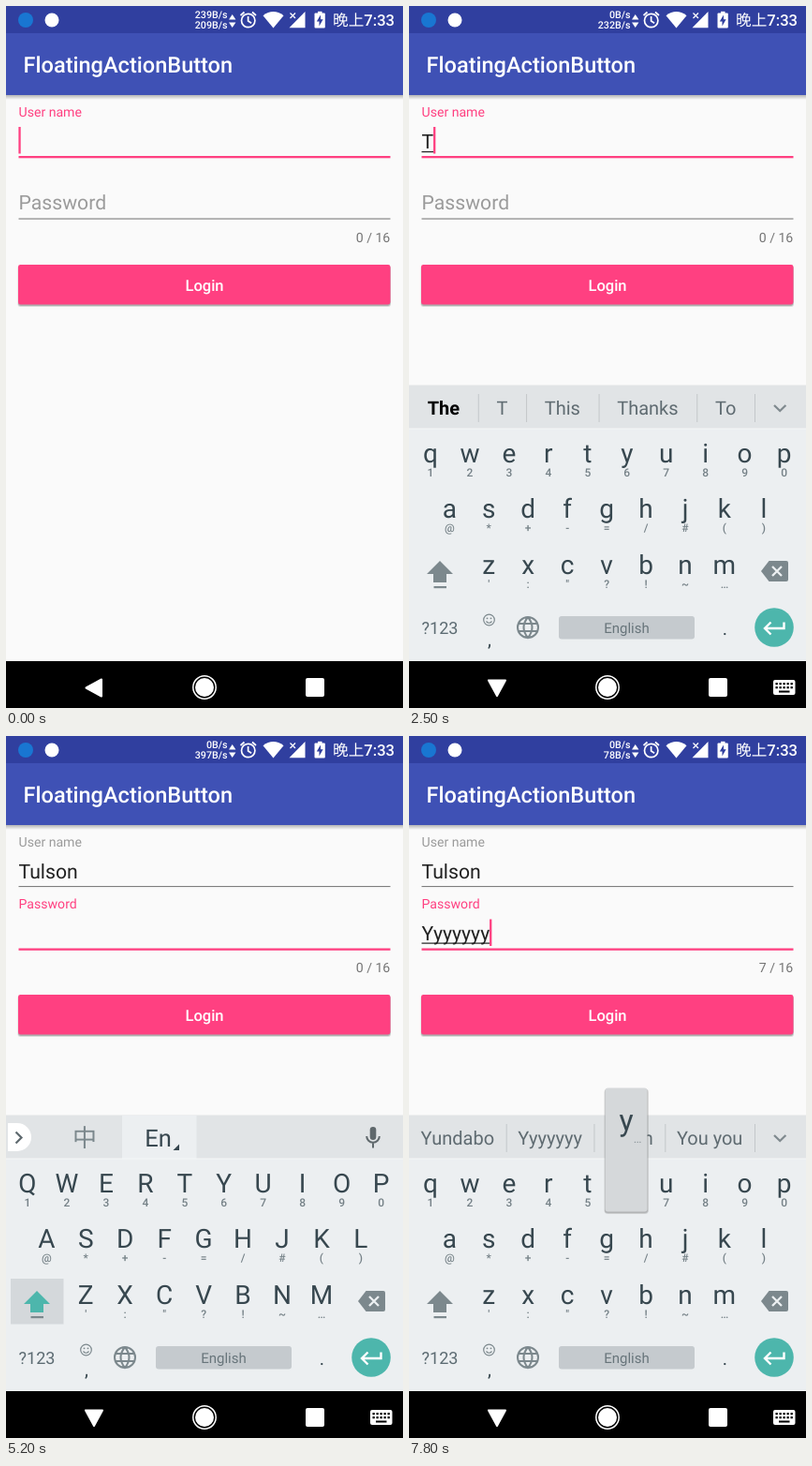
Write an HTML page that moves like this. It is 424 by 749 pixels and loops after 8 s.

```html
<!DOCTYPE html>
<html lang="en">
<head>
<meta charset="utf-8">
<title>Login form</title>
<style>
html, body { margin: 0; width: 100%; height: 100%; overflow: hidden; background: #fafafa; }
svg { display: block; font-family: Roboto, "Noto Sans CJK SC", "Noto Sans CJK", sans-serif; text-rendering: geometricPrecision; }
</style>
</head>
<body>
<svg id="stage" width="424" height="749" viewBox="0 0 424 749"></svg>
<script>
const LOOP = 8000, TICK = 100;
const PINK = '#ff4081', GREY = '#9b9b9b', RED = '#cc0000', TEAL = '#4db6ac';
const KEY = '#37474f', SUB = '#758187', ICON = '#7c888d', STRIP = '#e1e4e6', BODY = '#eceff1';
const stage = document.getElementById('stage');
const pen = document.createElement('canvas').getContext('2d');

// Timelines: each row holds from its time until the next row.
const speeds = [[0, 239, 209], [100, 0, 120], [1000, 51, 336], [1900, 0, 232], [2800, 51, 329],
  [3700, 0, 257], [4700, 0, 397], [5600, 51, 257], [6500, 52, 156], [7400, 0, 78]];
const userText = [[0, ''], [2400, 'T'], [2700, 'Tu'], [2800, 'Tul'], [3000, 'Tuls'], [3100, 'Tulso'], [3300, 'Tulson']];
const passLength = [[0, 0], [6500, 1], [6700, 2], [6800, 3], [7000, 4], [7200, 5], [7400, 6], [7700, 7]];
const hints = [[0, ''], [2400, '*The|T|This|Thanks|To'], [2700, '*Tuesday|Tu|Turn|Tune'], [2800, '*Tulip|Tul|Tulips|Full'],
  [3000, '*Tulson|Tuls|Tulip|Pulse'], [3100, '*Tulson|Tulso|Tulson\'s|Tutor'], [3300, '*Tulson|Tulson\'s|Tutor|Tuition'],
  [3800, ''], [6500, '*You|Y|Yes|Your|Yeah'], [6700, '*Yy|Yu|My|By|Ty|Yay'], [6800, '*You|Yyy|Guy|Try|Buy|But'],
  [7000, '*Yyyy|Yay|Yummy|Yay y'], [7200, 'Yyyyy|Yummy|Yearly|You y'], [7400, 'Yyyyyy|Yummy|Yearly|You y'],
  [7700, 'Yundabo|Yyyyyyy|Yearn|You you']];
// key, column centre, row, start, end
const popups = [['T', 190, 0, 2400, 2500], ['u', 274, 0, 2700, 2900], ['l', 379, 1, 2800, 2900], ['s', 85, 1, 3000, 3200],
  ['o', 359, 0, 3100, 3200], ['n', 295, 2, 3300, 3400], ['Y', 232, 0, 6500, 6600], ['y', 232, 0, 6700, 7500], ['y', 232, 0, 7700, LOOP]];
const rows = [['qwertyuiop', '1234567890', 23, 487], ['asdfghjkl', '@*+-=/#()', 43.3, 546], ['zxcvbnm', '\':"?!~…', 85.2, 606]];

const at = (table, t) => table.filter(row => row[0] <= t).pop();
const within = (t, ...spans) => spans.some(([a, b]) => t >= a && t < b);
const progress = (t, start, length) => Math.min(1, Math.max(0, (t - start) / length));
const easeOut = p => 1 - (1 - p) ** 2;
const lerp = (a, b, p) => a + (b - a) * p;
const mix = (a, b, p) => `color-mix(in srgb, ${b} ${p * 100}%, ${a})`;

const rect = (x, y, w, h, fill, rx = 0) => `<rect x="${x}" y="${y}" width="${w}" height="${h}" rx="${rx}" fill="${fill}"/>`;
const disc = (x, y, r, fill) => `<circle cx="${x}" cy="${y}" r="${r}" fill="${fill}"/>`;
const shape = (d, fill) => `<path d="${d}" fill="${fill}"/>`;
const line = (d, color, w = 2) => `<path d="${d}" fill="none" stroke="${color}" stroke-width="${w}"/>`;
const group = (attrs, content) => `<g ${attrs}>${content}</g>`;
const text = (x, y, size, fill, str, anchor = 'middle', weight = 400) =>
  `<text x="${x}" y="${y}" font-size="${size}" fill="${fill}" text-anchor="${anchor}" font-weight="${weight}">${str}</text>`;

function width(str, size, weight = 400) {
  pen.font = `${weight} ${size}px Roboto, sans-serif`;
  return pen.measureText(str).width;
}

function statusBar(t) {
  const [, up, down] = at(speeds, t), bar = '#303f9f';
  return rect(0, 0, 424, 29, bar) + disc(21, 15, 8, '#1976d2') + disc(49, 15, 7.5, '#fff')
    + text(236.5, 13, 10.7, '#fff', up + 'B/s', 'end', 500) + text(236.5, 24, 10.7, '#fff', down + 'B/s', 'end', 500)
    + shape('M238 14.5L241.7 9L245.4 14.5ZM238 17.5H245.4L241.7 23Z', '#fff')
    + line('M251.5 15.5a7.2 7.2 0 1 0 14.4 0a7.2 7.2 0 1 0 -14.4 0M258.6 11v5l3.5 2.2M250.5 10l4-3.5M267 10l-4-3.5', '#fff', 1.7)
    + shape('M274.5 10.2Q285.5 2 296.5 10.2L285.5 23.5Z', '#fff')
    + shape('M319.5 6V23.3H302.5Z', '#fff') + line('M303.5 7.5l5.5 5.5m0-5.5l-5.5 5.5', '#fff', 1.3)
    + rect(329.5, 7.5, 11.3, 16, '#fff', 1) + rect(333, 5.8, 4.5, 3, '#fff')
    + shape('M336 9.5L331.8 16.5H334.5V21.5L338.6 14.3H336Z', bar)
    + text(415, 21, 16.6, '#fff', '晚上7:33', 'end', 500);
}

function field(t) {
  const user = at(userText, t)[1], count = at(passLength, t)[1];
  const pass = count ? 'Y' + 'y'.repeat(count - 1) : '';
  const onPass = t >= 3700, focus = easeOut(progress(t, 3650, 300));
  const error = t >= 6500 && t < 7700;
  const errorAlpha = t >= 7700 ? (t < 7800 ? 0.5 : 0) : progress(t, 6400, 300);
  const cursorOff = within(t, [600, 1000], [1500, 1900], [4200, 4700], [5200, 5600], [6100, 6500]);
  const rule = (y, strong, color) => rect(13.5, y, 397, strong ? 2.3 : 1.1, strong ? color : '#7d7d7d');
  const composing = (str, y) => rect(13.5, y, width(str, 21.2), 1.2, '#212121');
  const caretX = 13.4 + width(onPass ? pass : user, 21.2);
  return text(13.5, 117.5, 14.1, mix(PINK, GREY, focus), 'User name', 'start')
    + text(13.5, 151.7, 21.2, '#212121', user, 'start')
    + (user && !onPass ? composing(user, 155) : '')
    + rule(160, !onPass, PINK)
    + text(13.5, lerp(217, 184, focus), lerp(21.2, 14.1, focus), mix(GREY, PINK, focus), 'Password', 'start')
    + text(13.5, 218.2, 21.2, '#212121', pass, 'start')
    + (pass ? composing(pass, 220.5) : '')
    + rule(226.5, onPass, error ? RED : PINK)
    + (cursorOff ? '' : rect(caretX, onPass ? 195.5 : 129, 2.3, 28.5, PINK))
    + group(`opacity="${errorAlpha}"`, text(13.5, 252 - 6 * (1 - (error ? errorAlpha : 1)), 14.1, RED, 'words must long than 6', 'start'))
    + text(410.3, 252, 14.1, '#757575', count + ' / 16', 'end');
}

function page(t) {
  return rect(0, 0, 424, 749, '#fafafa')
    + rect(0, 95, 424, 5, 'url(#fall)') + rect(0, 29, 424, 66, '#3f51b5')
    + text(18.5, 71, 23.56, '#fff', 'FloatingActionButton', 'start', 500)
    + field(t)
    + rect(12.5, 277, 398.5, 44, '#0002', 3) + rect(13, 277, 397.5, 43, '#0003', 3)
    + rect(13, 276, 397.5, 42.5, PINK, 2.4)
    + text(212, 304, 16.5, '#fff', 'Login', 'middle', 500);
}

const shiftIcon = (x, y, color) => shape(`M${x} ${y}l14 14h-7v9h-14v-9h-7Z`, color);
const deleteIcon = y => shape(`M376 ${y}l8.5-11H403q2 0 2 2v18q0 2-2 2H384.5Z`, ICON)
  + line(`M388 ${y - 5}l10 10m0-10l-10 10`, BODY, 2.3);

function letters(t) {
  const upper = within(t, [2000, 2500], [5200, 6600]);
  const pressed = within(t, [2000, 2100], [5200, 5300]);
  const keys = rows.map(([names, subs, x, y]) => [...names].map((name, i) =>
    text(x + 41.95 * i, y, 28, KEY, upper ? name.toUpperCase() : name)
    + text(x + 41.95 * i, y + 14.5, 12, SUB, subs[i], 'middle', 500)).join('')).join('');
  return (pressed ? rect(5, 579, 56.5, 48.5, '#d4d8db') : '') + keys
    + shiftIcon(33, 592, upper ? TEAL : ICON) + rect(26.5, 619, 13.5, 2.2, ICON) + deleteIcon(603);
}

function pinyin() {
  const names = ['‘词', 'abc', 'def', 'ghi', 'jkl', 'mno', 'pqrs', 'tuv', 'wxyz'];
  const keys = names.map((name, i) => {
    const x = 113 + 98.4 * (i % 3), y = 498 + 60 * Math.floor(i / 3);
    return text(x, y, 23, KEY, name) + text(x + 43.5, y - 26, 12, SUB, i + 1, 'middle', 500);
  }).join('');
  return keys + text(32, 490, 24, ICON, '?') + text(32, 535, 24, ICON, '!') + text(32, 580, 18, ICON, '…')
    + line('M23 618q5-6 9.5-1.5t9.5-1.5', ICON, 1.8)
    + line('M63.5 459V638M359.5 459V638', '#d0d4d6', 1) + rect(62.3, 459, 2, 66, '#90999d')
    + deleteIcon(489)
    + shape('M391 537l4 6h-8ZM391 561l4-6h-8ZM379 549l6-4v8ZM403 549l-6-4v8Z', ICON) + disc(391, 549, 2, ICON)
    + shiftIcon(391, 598, ICON) + text(390.5, 632.5, 8, ICON, '123', 'middle', 500);
}

function bottomRow(english) {
  return text(33, 670, 18, '#5c6b72', '?123')
    + line('M79.7 655a5.8 5.8 0 1 0 11.6 0a5.8 5.8 0 1 0 -11.6 0M82.5 656.5q3 3.5 6 0', ICON, 1.2)
    + disc(83.5, 653.3, 0.9, ICON) + disc(87.5, 653.3, 0.9, ICON)
    + text(86, 683, 20, KEY, ',')
    + line('M116 663a11 11 0 1 0 22 0a11 11 0 1 0 -22 0M127 652q-9 11 0 22q9-11 0-22M117.5 659h19M117.5 667h19', ICON, 2)
    + rect(160, 651, 145, 24.5, '#c5cace', 3)
    + (english ? text(232.5, 669, 15, '#68757b', 'English') + text(337.5, 670.5, 20, KEY, '.')
      : text(232.5, 670, 18.5, '#68757b', '拼音') + text(299, 663.5, 11, SUB, '0', 'middle', 700)
        + line('M334 668a3 3 0 1 0 6 0a3 3 0 1 0 -6 0', KEY, 1.5))
    + disc(390, 663, 20.8, TEAL) + line('M400.5 657.5v6.5H381M386.5 657.5l-6.5 6.5l6.5 6.5', '#fff', 2.4);
}

function tabs(slide) {
  const english = slide > 0.5;
  const mark = (x, y) => shape(`M${x} ${y}v6.5h-6.5Z`, KEY);
  return rect(45 + 79 * slide, 405, 79.5, 46, BODY)
    + shape('M2 413H12a14.8 14.8 0 0 1 0 30H2Z', '#fff') + line('M10.5 422.5l6 6l-6 6', '#5f6a6f', 2.2)
    + text(84, 438, 26, english ? ICON : KEY, '中') + text(162.5, 437.5, 25.5, english ? KEY : ICON, 'En')
    + (english ? mark(185, 435.5) : mark(103, 435.5))
    + rect(388.7, 417, 6.6, 14, '#5f686c', 3.3) + line('M385.2 427a6.8 6.8 0 0 0 13.6 0M392 434v5.5', '#5f686c', 2);
}

// Words share the strip with equal padding on both sides.
function suggestions(list) {
  const bold = list[0] === '*', words = list.replace('*', '').split('|');
  const weight = i => bold && i === 0 ? 700 : 400;
  const widths = words.map((word, i) => width(word, 20, weight(i)));
  const pad = (369 - widths.reduce((a, b) => a + b)) / words.length;
  let x = 0, out = '';
  words.forEach((word, i) => {
    const cell = widths[i] + pad;
    out += text(x + cell / 2, 436, 20, weight(i) > 400 ? '#000' : '#5f6b71', word, 'middle', weight(i));
    x += cell;
    out += rect(x, 414, 1, 30, '#c3c7ca');
  });
  return out + line('M390 426l6.2 6l6.2-6', '#808a8f', 2.3);
}

function popup([name, x, row]) {
  const top = [375.5, 443, 503][row], height = row ? 125 : 132, base = top + (row ? 42 : 45.5);
  return rect(x - 23.5, top + 1, 47.5, height + 1.5, '#0002', 4) + rect(x - 23, top + 1, 46, height + 0.5, '#0002', 3)
    + rect(x - 22.5, top, 45, height, '#d5d8da', 3)
    + text(x, base, 32, KEY, name) + text(x + 12, base + 13, 13, '#8c969a', '…');
}

function keyboard(t) {
  const enter = easeOut(progress(t, 0, 500)), slide = easeOut(progress(t, 1100, 450));
  const list = at(hints, t)[1];
  const panel = rect(0, 404.5, 424, 47, STRIP) + rect(0, 451, 424, 248, BODY)
    + (list ? suggestions(list) : tabs(slide)) + rect(0, 450.5, 424, 1, '#f5f7f8')
    + (slide < 1 ? group(`transform="translate(${-424 * slide})"`, pinyin()) : '')
    + (slide > 0 ? group(`transform="translate(${424 * (1 - slide)})"`, letters(t)) : '')
    + bottomRow(slide > 0.5)
    + popups.filter(p => within(t, [p[3], p[4]])).map(popup).join('');
  return group(`opacity="${enter}" transform="translate(0 ${60 * (1 - enter)})"`, panel);
}

function navBar(t) {
  const open = easeOut(progress(t, 0, 400));
  const dots = [0, 1, 2, 3, 4].map(i => rect(391.5 + 4 * i, 722, 2.3, 2.3, '#000') + rect(391.5 + 4 * i, 726, 2.3, 2.3, '#000')).join('');
  return rect(0, 699, 424, 50, '#000')
    + group(`transform="rotate(${-90 * open} 94 727.5)"`,
      '<path d="M85.5 727.5L102 718.5V736.5Z" fill="#fff" stroke="#fff" stroke-width="2" stroke-linejoin="round"/>')
    + disc(212, 727, 10, '#fff') + line('M199.8 727a12.2 12.2 0 1 0 24.4 0a12.2 12.2 0 1 0 -24.4 0', '#fff', 1.5)
    + rect(320, 717, 20, 20, '#fff', 2)
    + group(`opacity="${open}"`, rect(389, 719, 23.5, 16, '#fff', 2) + dots + rect(395, 730.5, 11.5, 2, '#000'));
}

const defs = '<defs><linearGradient id="fall" x2="0" y2="1"><stop stop-color="#000" stop-opacity=".28"/><stop offset="1" stop-color="#000" stop-opacity="0"/></linearGradient></defs>';
let start = null, shown = -1;

function frame(now) {
  if (start === null) start = now;
  const t = Math.floor(((now - start) % LOOP) / TICK) * TICK;
  if (t !== shown) {
    shown = t;
    stage.innerHTML = defs + page(t) + statusBar(t) + keyboard(t) + navBar(t);
  }
  requestAnimationFrame(frame);
}
requestAnimationFrame(frame);
</script>
</body>
</html>
```
